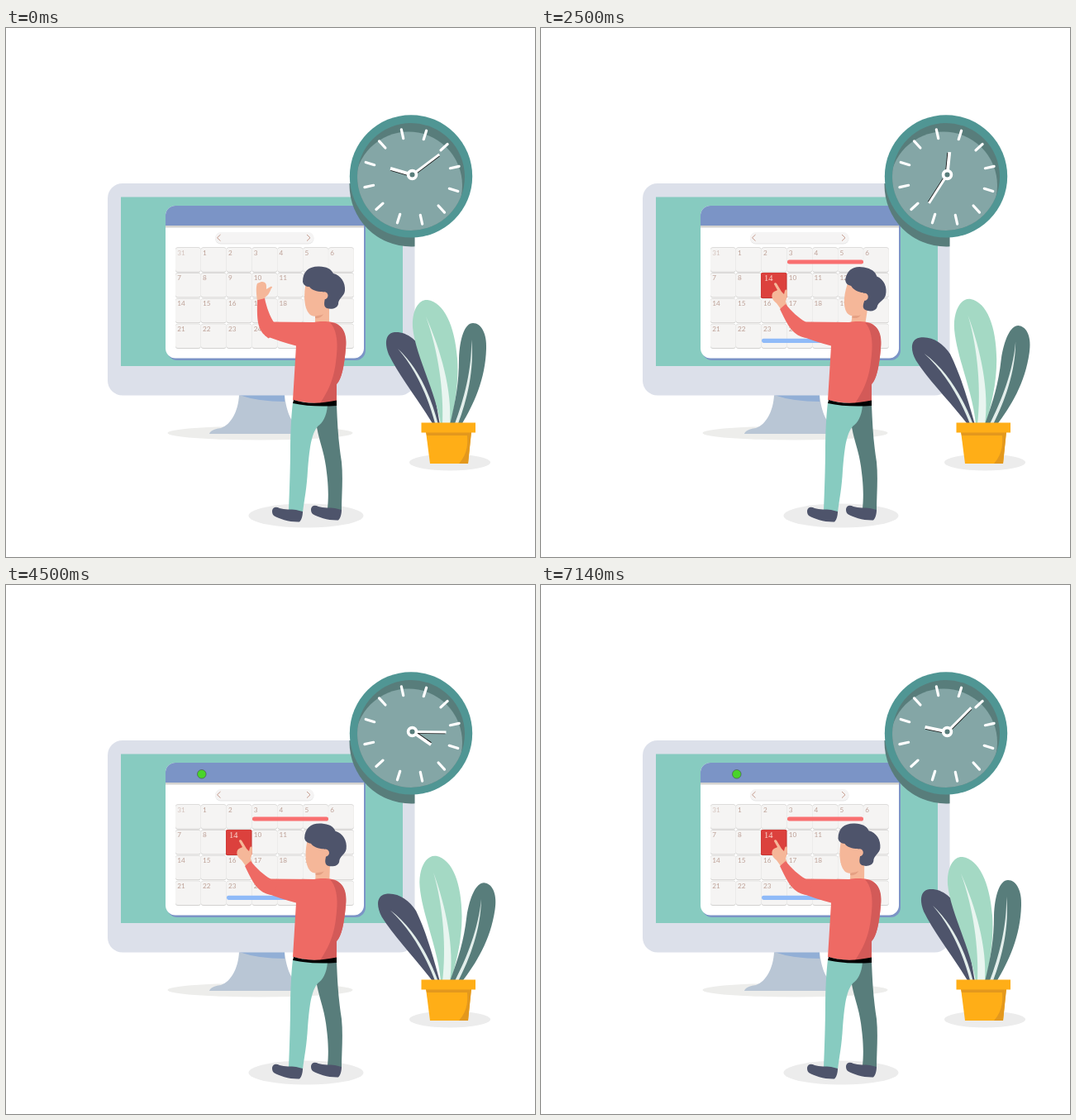
Recreate the animation shown at these times as an HTML page. Size 640 by 640 pixels, loop 7210 ms.

```html
<!DOCTYPE html>
<html lang="en">
<head>
<meta charset="utf-8">
<title>Calendar planning</title>
<style>
  html, body { margin: 0; width: 100%; height: 100%; overflow: hidden; background: #fff; }
  svg { display: block; width: 100vw; height: 100vh; }
  .day { font: 8.2px Lato, "Open Sans", sans-serif; fill: #bda096; }
  .card-label { font: 10.5px "Liberation Serif", serif; fill: #fbd9cf; }
</style>
</head>
<body>
<svg viewBox="0 0 640 640">
  <defs>
    <clipPath id="monitorClip"><rect x="123" y="188" width="371.5" height="256.5" rx="18"/></clipPath>
    <clipPath id="faceClip"><circle cx="490" cy="180" r="65"/></clipPath>
    <clipPath id="windowClip"><rect x="193" y="215" width="240" height="184.5" rx="12"/></clipPath>
    <path id="shoe" d="M322 584C323 579 327 579 331 581C337 583 345 582 351 583L359 585C359 591 357 596 355 597.5C343 598 331 594 324 590C322 588 322 586 322 584Z"/>
  </defs>

  <!-- monitor -->
  <ellipse cx="307.5" cy="490" rx="112" ry="8.5" fill="#ededeb"/>
  <path fill="#b9c6d5" d="M282 444H337C339 464 346 481 357 485C366 485 371 487 372 491H246C247 487 252 485 260 484C272 480 281 464 282 444Z"/>
  <path fill="#92afd6" d="M282 444H337V452Q305 452 282 444Z"/>
  <rect x="123" y="188" width="371.5" height="256.5" rx="18" fill="#dce0ea"/>
  <rect x="139" y="204.5" width="341" height="204.5" fill="#87cbc0"/>

  <!-- calendar window -->
  <rect x="195" y="217" width="240" height="185" rx="12" fill="#7b94c6"/>
  <g clip-path="url(#windowClip)">
    <rect x="193" y="215" width="240" height="185" fill="#fff"/>
    <rect x="193" y="215" width="240" height="24" fill="#7b94c6"/>
    <rect x="193" y="239" width="240" height="2.5" fill="#d3d2cf"/>
  </g>
  <rect x="253" y="248" width="119.5" height="13.5" rx="6.7" fill="#e6e6e6"/>
  <rect x="253" y="247" width="119.5" height="13.5" rx="6.7" fill="#f5f4f4"/>
  <path d="M259.5 250L255.500 253.8L259.5 257.6M364 250L368 253.8L364 257.6" fill="none" stroke="#c69c8e"/>
  <g id="days"></g>
  <g id="lights" stroke="#45494f" stroke-width=".6">
    <circle cx="208" cy="228.8" r="5.3" fill="#ec3b35"/>
    <circle cx="222.6" cy="228.8" r="5.3" fill="#f3bb2d"/>
    <circle cx="236.8" cy="228.8" r="5.3" fill="#49d42b"/>
  </g>
  <rect id="redBar" x="298" y="280.4" width="92" height="5.2" rx="2.3" fill="#f96f70"/>
  <rect id="blueBar" x="267" y="375.7" width="92" height="5.2" rx="2.3" fill="#8fbaf8"/>
  <g id="card">
    <rect x="266" y="296" width="31.5" height="31" rx="1.5" fill="#c73532"/>
    <rect x="266.5" y="296.3" width="30" height="29.7" rx="1.5" fill="#dc413d"/>
    <text class="card-label" x="270" y="306">14</text>
  </g>

  <!-- clock -->
  <circle cx="490" cy="190" r="74.5" fill="#587d7b" clip-path="url(#monitorClip)"/>
  <circle cx="490" cy="179.4" r="74.2" fill="#509694"/>
  <circle cx="490" cy="180" r="65" fill="#587d7b"/>
  <circle cx="487" cy="190.5" r="65" fill="#84a6a6" clip-path="url(#faceClip)"/>
  <g id="ticks" stroke="#fff" stroke-width="3.2" stroke-linecap="round"></g>
  <g id="hourHand"><path d="M490 177V151" stroke="#111" stroke-width="2.5"/><path d="M491.5 177V150" stroke="#fff" stroke-width="3.8"/></g>
  <g id="minuteHand"><path d="M492.8 177V137.500" stroke="#111" stroke-width="2"/><path d="M491.5 177V136.5" stroke="#fff" stroke-width="3"/></g>
  <circle cx="491.5" cy="177.5" r="4.9" fill="#587d7b" stroke="#fff" stroke-width="3.7"/>

  <!-- plant -->
  <ellipse cx="537" cy="525.5" rx="49" ry="10" fill="#ececec"/>
  <g id="navyLeaf">
    <path fill="#4e546b" d="M517 480C499 450 475 420 463 395C457 380 460 369 470 368C485 367 498 378 505 392C515 420 520 450 525 480Z"/>
    <path fill="#e3eeeb" d="M474 388C499 411 514 445 523 480H519.5C511 447 496 413 474 388Z"/>
  </g>
  <g id="paleLeaf">
    <path fill="#a4d9c4" d="M526 480C520 440 495 395 492 362C491 340 500 328 510 329C530 332 543 360 546 400C548 430 543 455 538 480Z"/>
    <path fill="#e9f5f0" d="M508 349C526 390 540 438 537 480H528C530 440 523 390 508 349Z"/>
  </g>
  <g id="darkLeaf">
    <path fill="#587d7b" d="M537 480C544 450 548 430 548 400C549 375 555 357 565 357C575 357 582 370 581 388C580 425 566 455 551 480Z"/>
    <path fill="#e3eeeb" d="M563 377C567 412 558 450 546.5 480H542.5C554 450 564 412 563 377Z"/>
  </g>
  <path fill="#ffae17" d="M508 488H563L559 527H513Z"/>
  <path fill="#e3981d" d="M508 489H563L559 527H548C557 517 559 506 558 493H509Z"/>
  <rect x="502.5" y="477.5" width="65.5" height="12" fill="#ffae17"/>

  <!-- man -->
  <ellipse cx="363" cy="590" rx="69.5" ry="14.5" fill="#ececec"/>
  <path fill="#587d7b" d="M385 456H400C401 480 402 500 406 525C408 545 406 565 406 584L389 582C391 560 389 545 387 530C384 510 379 500 376 483Z"/>
  <path fill="#87cbc0" d="M347 453Q365 458 389 456C388 470 383 478 377 482C369 492 367 510 365 535C364 556 361 570 359 586L342 584C343 560 344 530 344 510C344 490 345 470 347 453Z"/>
  <g fill="#4e546b"><use href="#shoe"/><use href="#shoe" x="47" y="-2"/></g>
  <g id="head">
    <path fill="#f5b799" d="M374 343L391 330V358H374Z"/>
    <path fill="#e5a083" d="M374 348Q381 348 384 346Q381 352 374 351Z"/>
    <path fill="#f5b799" d="M363 307C360 322 360 338 367 346C372 351 380 349 385 340L388 318L380 308Z"/>
    <path fill="#4e546b" d="M359 307C359 294 367 288 379 288.5C388 289 393 291 396 297C405 299 411 308 410 318C409 325 402 327 402 334C401 339 394 341 388 339C384 337 385 332 386 327L383 319C376 319 370 317 367 313C363 313 360 311 359 307Z"/>
    <circle cx="385" cy="323.7" r="4.5" fill="#f5b799"/>
  </g>
  <path fill="#ee6a64" d="M319 355.500L373 356C382 354 398 355 402 359C410 366 412 375 411 388C409 410 406 425 400 431V452Q375 457 347 450L351 384.5Q330 379 313 372Z"/>
  <path fill="#d35a58" d="M392 356.5C410 357 413 374 411 388C409 410 406 425 400 431V452L380 454C394 433 398 418 400 395C402 378 399 363 392 356.5Z"/>
  <path d="M348 450Q370 457 400 450.5V457Q370 459 347 454Z"/>
  <g id="forearm">
    <path id="pointingHand" fill="#f5b799" d="M290 340L285 333C281 330 278 326 280 321C282 318 285 318 286 317L282 310C282 308 284 308 285 309L291 319L294 322L295 318C296 316 298 316 298 319C298 324 297 328 296 331L298 336Z"/>
    <path id="openHand" fill="#f5b799" transform="rotate(-27 319 366)" d="M304 330C303 322 302 314 304 309L309 307C312 307 315 308 315 312V316L320 313C322 312 323 314 321 315C319 320 317 324 314 325L312 330Z"/>
    <path fill="#ee6a64" d="M289 340L296 334C303 343 312 351 320 355.5L328 364L322 375Q318 374.5 315 373.5C304 369 299 361 289 340Z"/>
  </g>
</svg>
<script>
const LOOP = 7210, SETTLED = 1160;
const el = id => document.getElementById(id);
const clamp = v => Math.min(1, Math.max(0, v));
const span = (t, from, to) => clamp((t - from) / (to - from));
const turn = (id, angle, x, y) => el(id).setAttribute('transform', `rotate(${angle} ${x} ${y})`);
const show = (node, on) => node.setAttribute('visibility', on ? 'visible' : 'hidden');

function buildDays() {
  let out = '';
  for (let i = 0; i < 28; i++) {
    const x = 205 + 30.85 * (i % 7), y = 265.3 + 30.8 * Math.floor(i / 7);
    out += `<rect x="${x}" y="${y}" width="30.7" height="30.4" rx="3" fill="#d2d1cf"/>
      <rect x="${x}" y="${y + .6}" width="30.7" height="28.8" rx="3" fill="#f5f4f3"/>
      <text class="day" x="${x + 2.2}" y="${y + 9.3}" opacity="${i ? 1 : .6}">${i || 31}</text>`;
  }
  el('days').innerHTML = out;
}

function buildTicks() {
  for (let i = 0; i < 12; i++)
    el('ticks').innerHTML += `<path d="M491 121.5V132.5" transform="rotate(${17.5 + 30 * i} 491 180)"/>`;
}

// Three sways between start and the end of the loop, lingering near rest.
function sway(t, start) {
  return Math.sin(span(t, start, LOOP) * 3 * Math.PI) ** 4;
}

// [from, to, light]
const lightSteps = [
  [1990, 2430, 0], [2570, 3210, 0], [3210, 3965, 1], [3965, 4790, 2],
  [4790, 5570, 0], [5570, 6360, 1], [6360, LOOP, 2]
];

function render(t) {
  turn('forearm', 27 * (1 - span(t, 0, 1230)), 319, 366);
  show(el('openHand'), t < 350);
  show(el('pointingHand'), t >= 350);

  const arrive = 1 - (1 - span(t, 830, 1530)) ** 3;
  const away = 137 * (1 - arrive);
  el('redBar').setAttribute('transform', `translate(${away} 0)`);
  el('blueBar').setAttribute('transform', `translate(${-away} 0)`);
  el('redBar').setAttribute('opacity', arrive);
  el('blueBar').setAttribute('opacity', arrive);
  el('card').setAttribute('transform', `translate(226 339) scale(${arrive}) translate(-226 -339)`);

  const run = span(t, SETTLED, LOOP);
  turn('hourHand', 286 + 360 * run, 491.5, 177.5);
  turn('minuteHand', 53 + 720 * run, 491.5, 177.5);

  const nod = 1 - Math.abs(1 - (run * 2 % 1) * 2);
  turn('head', 10 * nod, 378, 365);

  turn('navyLeaf', -7.2 * sway(t, 1400), 522, 480);
  turn('paleLeaf', 6.6 * sway(t, SETTLED), 532, 480);
  turn('darkLeaf', 6.8 * sway(t, 1700), 543, 480);

  const step = lightSteps.find(([from, to]) => t >= from && t < to);
  [...el('lights').children].forEach((light, i) => show(light, step && step[2] === i));
}

buildDays();
buildTicks();
const began = performance.now();
function tick() {
  render((performance.now() - began) % LOOP);
  requestAnimationFrame(tick);
}
tick();
</script>
</body>
</html>
```
